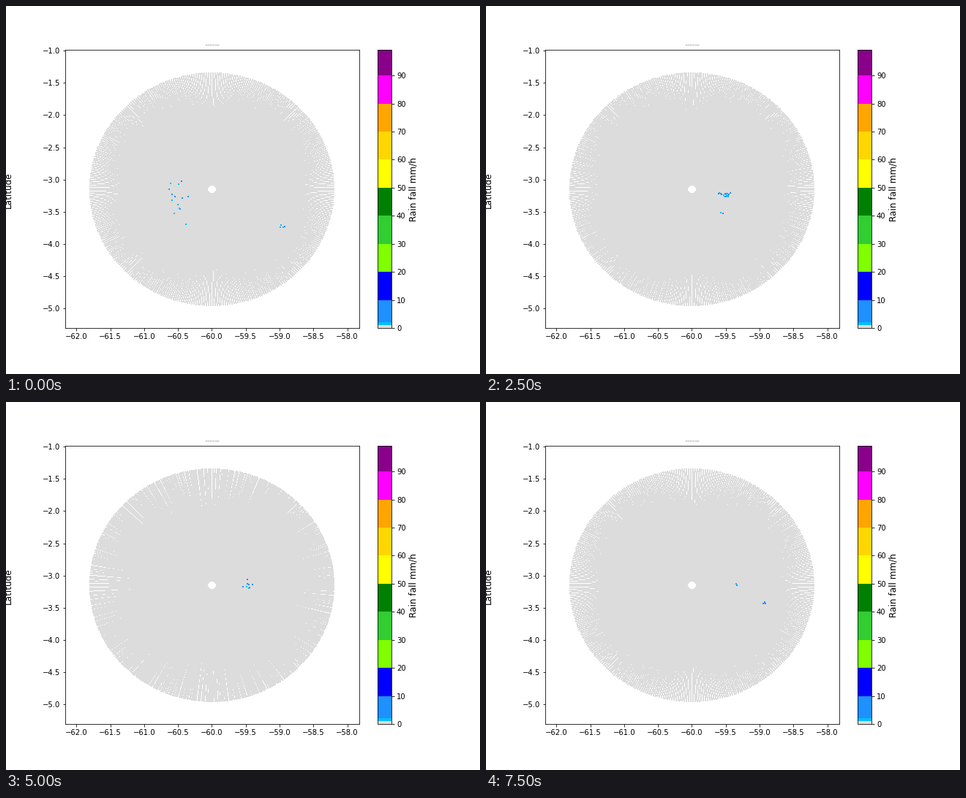
Animation, 648 px wide and 504 px high, one loop 8 s. Source, as a matplotlib script:

```python
import numpy as np
import matplotlib.pyplot as plt
from matplotlib.animation import FuncAnimation
from matplotlib.cm import ScalarMappable
from matplotlib.colors import BoundaryNorm, ListedColormap

plt.rcParams.update({"font.family": "DejaVu Sans", "font.size": 10})

W, H, SCANS = 648, 504, 16
LON, LAT = -60.0, -3.15        # radar site
CX, CY = 281.4, 250.95         # its place on the stage
KX, KY = 92.6, 88.35           # pixels per degree
GATES = np.linspace(0.072, 1.799, 220)

BOUNDS = [0, 1, 2, *range(10, 100, 10), 99]
COLORS = ["gainsboro", "deepskyblue", "dodgerblue", "blue", "chartreuse",
          "limegreen", "green", "yellow", "gold", "orange", "magenta",
          "darkmagenta"]
CMAP = ListedColormap(COLORS)
NORM = BoundaryNorm(BOUNDS, len(COLORS))

# Key points: scan, lon, lat, lon spread, lat spread, echo count.
MAIN_STORM = [(0, -60.50, -3.32, 0.09, 0.20, 14),
              (3, -59.63, -3.45, 0.05, 0.02, 45),
              (6, -59.40, -3.13, 0.06, 0.02, 8),
              (8, -59.48, -3.13, 0.03, 0.02, 14),
              (10, -59.49, -3.14, 0.06, 0.03, 8),
              (12, -59.45, -3.14, 0.03, 0.02, 0),
              (15, -59.35, -3.13, 0.01, 0.02, 2)]
SIDE_STORM = [(0, -58.95, -3.72, 0.02, 0.03, 4),
              (2, -59.30, -3.60, 0.02, 0.02, 0),
              (6, -59.65, -3.48, 0.03, 0.01, 3),
              (8, -59.40, -3.46, 0.02, 0.02, 0),
              (12, -59.10, -3.44, 0.02, 0.02, 0),
              (15, -58.93, -3.43, 0.01, 0.02, 4)]
# How far a second sweep strays from the first; 0 means a single sweep.
SPREAD = [(0, 0), (3, 0.22), (6, 0), (8, 0.36), (10, 0.4), (12, 0.18), (15, 0)]


def at(keys, index):
    """Interpolate every column of a key table."""
    t, *columns = zip(*keys)
    return [np.interp(index, t, c) for c in columns]


def stamp(image, dx, dy, value):
    """Draw 2 by 2 pixel squares at offsets in degrees from the radar."""
    col = np.rint(CX + KX * dx - 1).astype(int)
    row = np.rint(CY - KY * dy - 1).astype(int)
    for i in (0, 1):
        for j in (0, 1):
            image[row + j, col + i] = value


def sweep(image, azimuth):
    a = np.radians(azimuth)[:, None]
    stamp(image, GATES * np.sin(a), GATES * np.cos(a), 0.5)


def rain(image, storm, index, rng):
    lon, lat, sx, sy, count = at(storm, index)
    n = int(round(count))
    stamp(image, rng.normal(lon - LON, sx, n), rng.normal(lat - LAT, sy, n),
          np.minimum(1.2 + rng.exponential(1.8, n), 15))


def scan(index):
    rng = np.random.default_rng(40 + index)
    image = np.full((H, W), np.nan)
    spread, = at(SPREAD, index)
    azimuth = np.arange(360) + 0.5 + rng.normal(0, 0.02 + 0.15 * spread, 360)
    sweep(image, azimuth)
    sweep(image, azimuth + rng.uniform(-spread, spread, 360))
    for storm in (MAIN_STORM, SIDE_STORM):
        rain(image, storm, index, rng)
    return np.ma.masked_invalid(image)


images = [scan(i) for i in range(SCANS)]

fig = plt.figure(figsize=(W / 72, H / 72), dpi=72, facecolor="white")
picture = fig.figimage(images[0], cmap=CMAP, norm=NORM, origin="upper")

ax = fig.add_axes([0.125, 0.125, 0.62, 0.755], facecolor="none")
ax.set_xlim(LON - (CX - 0.125 * W) / KX, LON + (0.745 * W - CX) / KX)
ax.set_ylim(LAT - (0.875 * H - CY) / KY, LAT + (CY - 0.12 * H) / KY)
ax.set_xticks(np.arange(-62, -57.9, 0.5))
ax.set_yticks(np.arange(-5, -0.9, 0.5))
ax.set_title("Rain rate 00:00 scan", fontsize=1.7)
fig.text(7 / W, 0.5, "Latitude", fontsize=12, rotation=90,
         rotation_mode="anchor", ha="center", va="baseline")

cax = fig.add_axes([0.78375, 0.125, 19.03 / W, 0.755])
bar = fig.colorbar(ScalarMappable(NORM, CMAP), cax=cax,
                   spacing="proportional", ticks=range(0, 100, 10))
bar.minorticks_off()
bar.set_label("Rain fall mm/h", fontsize=12)


def update(index):
    picture.set_data(images[index])
    return [picture]


anim = FuncAnimation(fig, update, frames=SCANS, interval=500,
                     repeat=True, repeat_delay=0)
plt.show()
```
